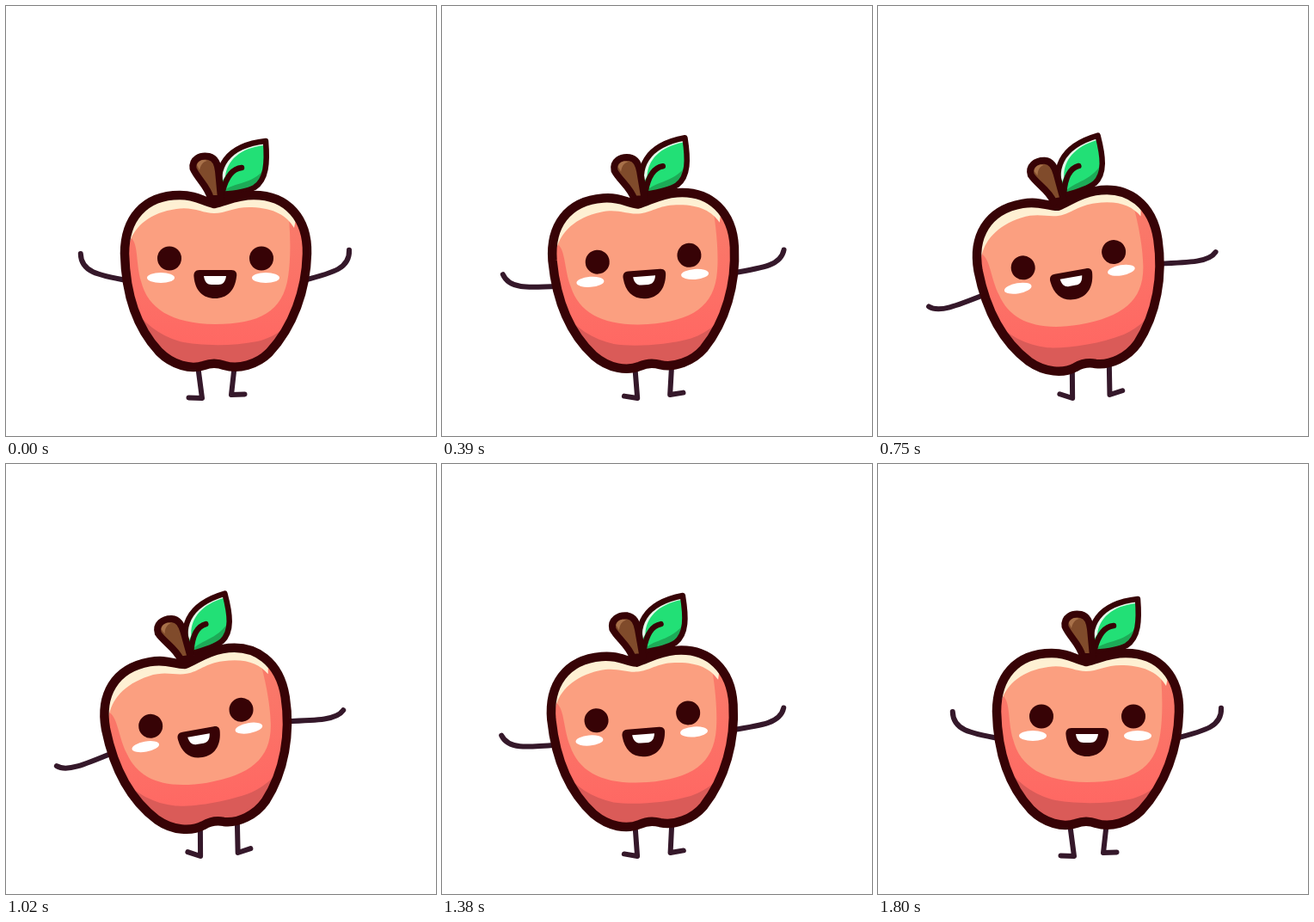
Write an HTML page that moves like this. It is 500x500 px and loops after 1.83 s.

```html
<!DOCTYPE html>
<html lang="en">
<head>
<meta charset="utf-8">
<title>Swaying apple</title>
<style>
  html, body { margin: 0; width: 100%; height: 100%; overflow: hidden; background: #fff; }
  svg { display: block; width: 100%; height: 100%; }
  .limb { fill: none; stroke: #35182a; stroke-width: 6; stroke-linecap: round; stroke-linejoin: round; }
  .line { stroke: #370306; stroke-width: 10.5; stroke-linejoin: round; stroke-linecap: round; }
  .thin { stroke-width: 6.5; }
  .stem { stroke-width: 8; }
  .hollow { fill: none; }
  .dark { fill: #370306; }
</style>
</head>
<body>
<svg viewBox="0 0 500 500">
  <defs>
    <path id="skin" d="M242 230C228 227 222 220 202 220C160 220 138 248 138 288C139 330 150 372 178 402C194 418 215 423 230 418C238 415 246 415 254 418C270 423 292 417 306 403C334 373 349 330 350 288C351 248 328 220 288 220C268 220 256 227 242 230Z"/>
    <path id="leaf" d="M250 219C242 188 256 162 302 157C304 182 303 202 289 211C278 217 262 218 250 219Z"/>
    <clipPath id="inSkin"><use href="#skin"/></clipPath>
    <clipPath id="inLeaf"><use href="#leaf"/></clipPath>
    <linearGradient id="coral" x1="0" y1="0" x2="0" y2="1">
      <stop offset="0" stop-color="#f7806c"/>
      <stop offset="1" stop-color="#ff6863"/>
    </linearGradient>
  </defs>

  <path id="legL" class="limb"/>
  <path id="legR" class="limb"/>

  <g id="apple">
    <path id="armL" class="limb"/>
    <path id="armR" class="limb"/>

    <g clip-path="url(#inLeaf)">
      <use href="#leaf" fill="#22e076"/>
      <path fill="#1dab57" d="M248 220C262 202 284 212 304 186V222H248Z"/>
      <path fill="#e4fbea" d="M250 206C246 180 262 158 300 157V162C272 165 257 180 255 198Z"/>
    </g>
    <use href="#leaf" class="line thin hollow"/>
    <path class="line thin hollow" d="M252 215C256 200 263 189 274 188"/>

    <g clip-path="url(#inSkin)">
      <use href="#skin" fill="#da5b58"/>
      <path fill="url(#coral)" d="M130 210H360V330C345 358 322 383 292 390C262 396 224 395 202 390C178 383 158 368 145 345L130 330Z"/>
      <path fill="#fb9f80" d="M150 215H325C331 250 332 290 328 315C322 355 295 370 243 370C192 369 165 352 157 320C151 300 154 278 146 270Z"/>
      <path fill="#fef0d3" d="M144 274C150 256 168 240 198 236C218 233 228 241 242 241C256 241 266 233 286 234C312 235 327 244 335 258L345 210H140Z"/>
    </g>
    <use href="#skin" class="line hollow"/>

    <path class="line stem" fill="#804b2b" d="M238 224C235 210 222 200 217.500 189C216 178 226 173 236 175C244 177 246 184 247 192L250 224Z"/>
    <path fill="#a8714a" d="M222 185C224 179 230 178 234 180C229 181 226 185 225 191Z"/>

    <circle class="dark" cx="190" cy="293.500" r="14"/>
    <circle class="dark" cx="297" cy="293.500" r="14"/>
    <ellipse fill="#fff" cx="180" cy="316" rx="16" ry="6"/>
    <ellipse fill="#fff" cx="302" cy="316" rx="16" ry="6"/>
    <path class="dark" d="M225 307H262C267 307 269 310 268 315C266 331 257 340 243 340C229 340 220 331 218.500 315C218 310 220 307 225 307Z"/>
    <path fill="#fff" d="M230 314H256C255 321 252 324 247 324H239C234 324 231 321 230 314Z"/>
  </g>
</svg>
<script>
  const LOOP = 1830, STEP = 30, HALF = 900, TILT = 10.6;
  const LEFT = -1, RIGHT = 1;
  const el = id => document.getElementById(id);

  // Point at a distance and an upward angle, on the given side.
  function polar([x, y], side, reach, degrees) {
    const a = degrees * Math.PI / 180;
    return [x + side * reach * Math.cos(a), y - reach * Math.sin(a)];
  }

  // The arm turns at the shoulder and straightens as it comes down.
  function arm(side, shoulder, lift, sway) {
    const hand = lift - 36 * sway;
    const elbow = hand - 22 + 12 * sway;
    const reach = 56 + 4 * sway;
    const at = (part, angle) => polar(shoulder, side, reach * part, angle);
    return `M${at(-0.15, elbow)}C${at(0.5, elbow)} ${at(0.85, elbow)} ${at(1, hand)}`;
  }

  // The hip follows the body while the toe lifts off the ground.
  function leg(side, [hipX, hipY], [footX, footY], shift, sway) {
    const ankle = [footX + shift * sway, footY];
    return `M${hipX + 3 * sway} ${hipY}L${ankle}L${polar(ankle, side, 15.5, 2 + 17 * sway)}`;
  }

  function draw(time) {
    const t = Math.floor((time % LOOP) / STEP) * STEP;
    const sway = (1 - Math.cos(Math.PI * t / HALF)) / 2;
    el("apple").setAttribute("transform", `rotate(${-TILT * sway} 242 422)`);
    el("armL").setAttribute("d", arm(LEFT, [134, 318], 32.5, sway));
    el("armR").setAttribute("d", arm(RIGHT, [354, 317], 36.5, sway));
    el("legL").setAttribute("d", leg(LEFT, [223, 418], [228, 456], -2, sway));
    el("legR").setAttribute("d", leg(RIGHT, [266, 416], [262, 452], 8, sway));
  }

  const start = performance.now();
  function tick() {
    draw(performance.now() - start);
    requestAnimationFrame(tick);
  }
  tick();
</script>
</body>
</html>
```
